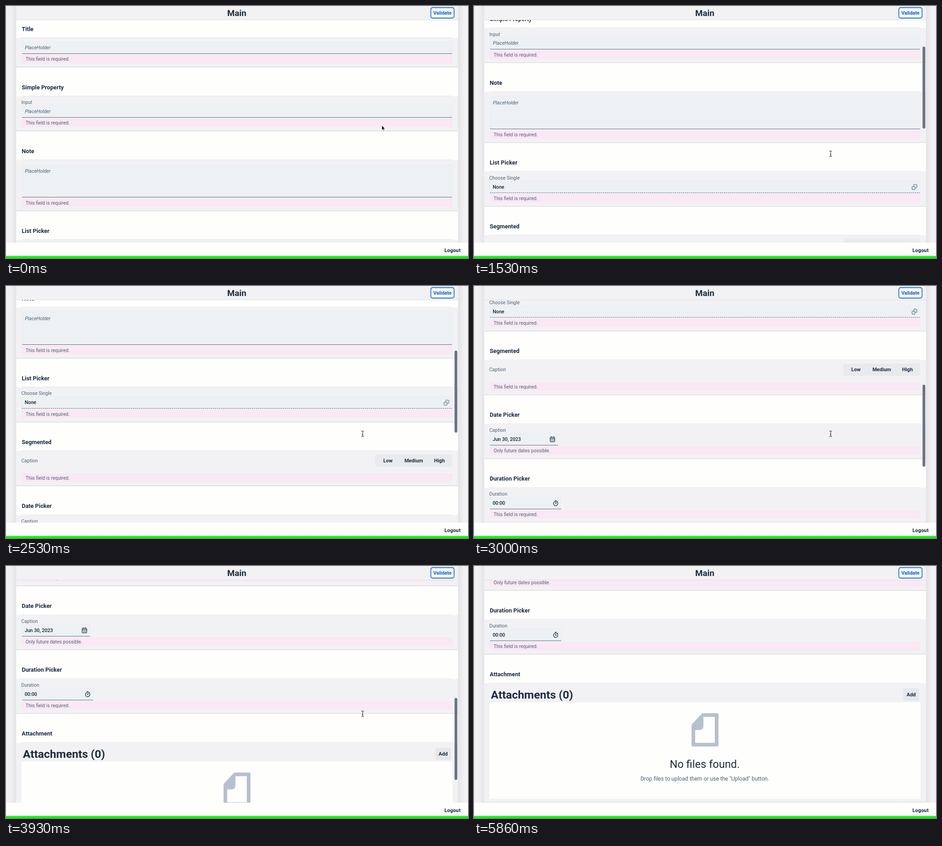
An HTML page for the animation above (5960 ms loop, 1013 px wide and 553 px high).

```html
<!DOCTYPE html>
<html lang="en">
<head>
<meta charset="utf-8">
<title>Form scroll</title>
<style>
  html, body { margin: 0; width: 100%; height: 100%; overflow: hidden; background: #f1f1f3; }
  svg { display: block; width: 100%; height: 100%; }
  text { font-family: Roboto, "Open Sans", sans-serif; white-space: pre; }
</style>
</head>
<body>
<svg id="stage" viewBox="0 0 1013 553" xmlns="http://www.w3.org/2000/svg"></svg>
<script>
const LOOP = 5960, MAX_SCROLL = 816, STEP = 1000 / 15;
const INK = '#1d2d3e', MUTED = '#4f6074', GRAY = '#f2f2f4', WHITE = '#fefefd';
const LEFT = 34, RIGHT = 979;

const rect = (x, y, w, h, fill, more = '') =>
  `<rect x="${x}" y="${y}" width="${w}" height="${h}" fill="${fill}" ${more}/>`;
const line = (x1, x2, y, color, more = '') =>
  `<path d="M${x1} ${y}H${x2}" stroke="${color}" fill="none" ${more}/>`;
// y is the middle of the capitals
const text = (x, y, size, str, fill = INK, more = '') =>
  `<text x="${x}" y="${y + size * 0.36}" font-size="${size}" fill="${fill}" ${more}>${str}</text>`;
const bold = (x, y, size, str, fill = INK, more = '') =>
  text(x, y, size, str, fill, 'font-weight="700" ' + more);
const mid = 'text-anchor="middle"';

const label = (y, str) => text(33.5, y, 10.5, str, MUTED);
const hint = y => text(41.5, y, 10.7, 'PlaceHolder', MUTED, 'font-style="italic"');
const value = (y, str) => text(41, y, 10.7, str, '#16202c', 'font-weight="500"');

function input(top, bottom, right = RIGHT, dash = '') {
  return rect(34.5, top + 0.5, right - 35, bottom - top, '#edf1f4', 'stroke="#e8edf1"') +
    line(35, right - 1, bottom, '#5d6b7b', dash && `stroke-dasharray="${dash}"`);
}

function message(end, str) {
  return rect(LEFT, end - 27, RIGHT - LEFT, 18.5, '#fae8f4') +
    text(43, end - 17.5, 10.5, str, MUTED);
}

const copyIcon = y => `<g transform="translate(965.5 ${y})" fill="none" stroke="#5f7489" stroke-width="1.2">
  <rect x="-5" y="-1" width="6.5" height="6.5" rx="1"/>
  <path d="M-1.5 -1V-4.500Q-1.500 -5.500 -.5 -5.500H4.500Q5.500 -5.500 5.500 -4.500V.5Q5.500 1.500 4.500 1.500H1.500"/></g>`;

const calendarIcon = y => `<g transform="translate(172 ${y})" fill="none" stroke="${INK}" stroke-width="1.2">
  <rect x="-5" y="-4.500" width="10" height="10" rx="1.500"/>
  <path d="M-5 -1.500H5M-2.500 -6.500V-3.500M2.500 -6.500V-3.500"/>
  <path d="M-3 1H3.500M-3 3.300H3.500" stroke-dasharray="1.300 1.200"/></g>`;

const watchIcon = y => `<g transform="translate(179 ${y})" fill="none" stroke="${INK}" stroke-width="1.300">
  <circle cy="1" r="4.800"/><path d="M-2 -5.700H2M0 1V-2M0 1H2M3.800 -4L5 -2.800"/></g>`;

function segments(y) {
  return rect(809.5, y - 13, 169, 27, '#e8eaed', 'rx="5"') +
    [[837.5, 'Low'], [894, 'Medium'], [950.5, 'High']]
      .map(([x, str]) => bold(x, y, 11.1, str, INK, mid)).join('');
}

function emptyFiles(h) {
  return bold(37, h + 44.5, 24.7, 'Attachments (0)') +
    rect(941, h + 31, 35, 27, '#e6e8ec', 'rx="5"') +
    bold(958.5, h + 44.5, 11.2, 'Add', INK, mid) +
    rect(LEFT, h + 61.5, RIGHT - LEFT, 212, WHITE) +
    `<g transform="translate(477 ${h + 85.5})">
      <path d="M25 0H56Q59 0 59 3V70Q59 73 56 73H3Q0 73 0 70V27Q0 25 1.500 23.500L22 1.500Q23.500 0 25 0Z" fill="#b7c0cc"/>
      <path d="M26 8H51V65H8V37H17Q26 37 26 28Z" fill="${WHITE}"/></g>` +
    text(506, h + 197, 23.7, 'No files found.', INK, mid) +
    text(506, h + 229.5, 12.15, 'Drop files to upload them or use the "Upload" button.', MUTED, mid);
}

const REQUIRED = 'This field is required.';
const sections = [
  { name: 'Title', h: 50, end: 134, note: REQUIRED,
    body: h => input(h + 28, h + 54.5) + hint(h + 41) },
  { name: 'Simple Property', h: 178, end: 274, note: REQUIRED,
    body: h => label(h + 33.5, 'Input') + input(h + 40, h + 66.5) + hint(h + 53) },
  { name: 'Note', h: 318, end: 449.5, note: REQUIRED,
    body: h => input(h + 30, h + 101.5) + hint(h + 44) },
  { name: 'List Picker', h: 493, end: 589.5, note: REQUIRED,
    body: h => label(h + 33.5, 'Choose Single') + input(h + 40, h + 66.5, RIGHT, '3 1.5') +
      value(h + 53.5, 'None') + copyIcon(h + 54) },
  { name: 'Segmented', h: 633, end: 729.5, note: REQUIRED,
    body: h => label(h + 41, 'Caption') + segments(h + 41) },
  { name: 'Date Picker', h: 773.5, end: 869.5, note: 'Only future dates possible.',
    body: h => label(h + 33.5, 'Caption') + input(h + 40, h + 66.5, 185) +
      value(h + 53.5, 'Jun 30, 2023') + calendarIcon(h + 53.5) },
  { name: 'Duration Picker', h: 913.5, end: 1009.5, note: REQUIRED,
    body: h => label(h + 33.5, 'Duration') + input(h + 40, h + 66.5, 192) +
      value(h + 53.5, '00:00') + watchIcon(h + 53.5) },
  { name: 'Attachment', h: 1053.5, end: 1334.5, body: emptyFiles },
];

function section({ name, h, end, note, body }) {
  return rect(22.5, h + 20, 968.5, end - h - 20, GRAY) +
    line(LEFT, RIGHT, h + 19.5, '#e6e6e8') +
    line(22.5, 991, end, '#d9dadc', 'stroke-width="1.3"') +
    bold(34.5, h, 12.7, name) + body(h) + (note ? message(end, note) : '');
}

document.getElementById('stage').innerHTML = `
  <defs>
    <clipPath id="view">${rect(0, 31, 1013, 488.5, '#000')}</clipPath>
    <linearGradient id="shade"><stop offset="0" stop-color="#f1f1f3"/><stop offset="1" stop-color="#e4e4e6"/></linearGradient>
  </defs>
  ${rect(0, 0, 1013, 553, '#f1f1f3')}
  ${rect(10, 0, 12.5, 520, 'url(#shade)')}
  ${rect(-1003.5, 0, 12.5, 520, 'url(#shade)', 'transform="scale(-1 1)"')}
  ${rect(22.5, 30, 968.5, 490, WHITE)}
  <g clip-path="url(#view)"><g id="page">${sections.map(section).join('')}</g></g>
  ${rect(22.5, 0, 968.5, 30.5, GRAY)}
  ${line(22.5, 991, 30.5, '#e2e2e5')}
  ${bold(506, 15, 18.8, 'Main', INK, mid)}
  ${rect(931.5, 3.5, 51, 23, '#f8f9fb', 'rx="4" stroke="#2372c8" stroke-width="1.8"')}
  ${bold(957, 15, 10.9, 'Validate', '#1261bd', mid)}
  ${rect(983.5, 0, 6, 180, '#6c7284', 'id="thumb" rx="3"')}
  ${rect(0, 519.5, 1013, 30, WHITE)}
  ${bold(979, 536, 11.3, 'Logout', INK, mid)}
  ${rect(0, 548.5, 1013, 4.5, '#00ff00')}
  ${rect(0, 0, 1, 548, '#f8e8e2')}
  <g id="arrow"><path d="M0 0V10.500L2.500 8.300L4.200 12L6 11.200L4.300 7.600H7.500Z"
    fill="#111" stroke="#fff" stroke-width=".8" stroke-linejoin="round"/></g>
  <g id="beam"><path d="M-3 -6Q0 -6 0 -4.500Q0 -6 3 -6M0 -4.500V4.500M-3 6Q0 6 0 4.500Q0 6 3 6M-1.300 1.500H1.300"
    fill="none" stroke="#222b36" stroke-width="1.100"/></g>`;

const [page, thumb, arrow, beam] = ['page', 'thumb', 'arrow', 'beam'].map(id => document.getElementById(id));
const ramp = (t, a, b) => Math.min(1, Math.max(0, (t - a) / (b - a)));
const lerp = (a, b, p) => a + (b - a) * p;

// Each swipe: drag from one offset to another, then coast with friction
const swipes = [
  { start: 1015, release: 1170, from: 0, to: 60, coast: 141.5 },
  { start: 2375, release: 2530, from: 198, to: 291, coast: 262 },
  { start: 3610, release: 3790, from: 544, to: 625, coast: 217.5 },
];

function scrollAt(t) {
  const s = swipes.filter(w => t >= w.start).pop();
  if (!s) return 0;
  const glide = 1 - Math.exp(-Math.max(0, t - s.release) / 325);
  return Math.min(MAX_SCROLL, lerp(s.from, s.to, ramp(t, s.start, s.release)) + s.coast * glide);
}

function hold(t) {
  const base = t < 1930 ? 30 : t < 3430 ? 1930 : 3430;
  return base + Math.floor((t - base + 4) / STEP) * STEP;
}

function draw(time) {
  const t = hold(time), scroll = scrollAt(t);
  page.setAttribute('transform', `translate(0 ${-scroll})`);
  thumb.setAttribute('y', 33 + scroll * 0.374);
  thumb.setAttribute('opacity', scroll > 0 ? 1 - ramp(t, 4870, 5230) : 0);

  const move = ramp(t, 0, 225), leave = ramp(t, 4870, 5225);
  const x = lerp(824, 782, move), y = lerp(262, 324, move) - 345 * leave;
  const isBeam = move === 1 && scroll < 780;
  arrow.setAttribute('transform', `translate(${x} ${y})`);
  beam.setAttribute('transform', `translate(${x} ${y})`);
  arrow.setAttribute('display', isBeam ? 'none' : 'inline');
  beam.setAttribute('display', isBeam ? 'inline' : 'none');
}

const begin = performance.now();
function tick() {
  draw((performance.now() - begin) % LOOP);
  requestAnimationFrame(tick);
}
tick();
</script>
</body>
</html>
```
